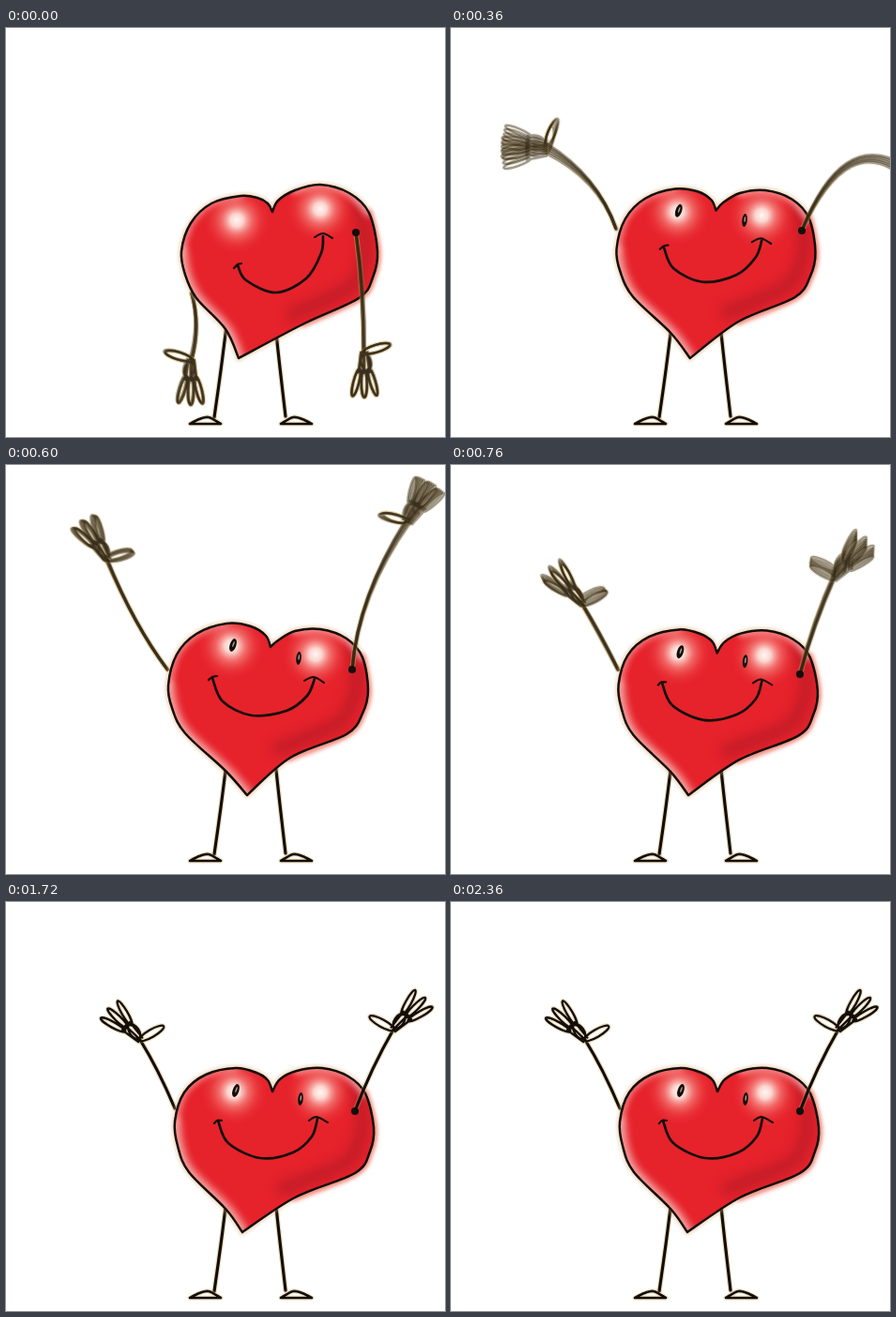
An HTML page with a canvas for the animation above (8000 ms loop, 468 px wide and 436 px high).

```html
<!DOCTYPE html>
<html lang="en">
<head>
<meta charset="utf-8">
<title>Cheering heart</title>
<style>
  html, body { margin: 0; width: 100%; height: 100%; overflow: hidden; background: #fff; }
  canvas { display: block; width: 468px; height: 436px; }
</style>
</head>
<body>
<canvas id="stage"></canvas>
<script>
const W = 468, H = 436, LOOP = 8000, STEP = 40, REST = 840;
const INK = '#130e09';
const canvas = document.getElementById('stage');
const ratio = window.devicePixelRatio || 1;
canvas.width = W * ratio;
canvas.height = H * ratio;
const ctx = canvas.getContext('2d');

// Three body poses as x,y pairs: leaning, stretched, settled.
const POSES = [
  {
    left: [284,196, 279,187, 268,181, 250,179, 219,187, 197,208, 187,238, 191,263, 203,288, 234,321, 248,352],
    right: [284,196, 290,184, 308,173, 335,167, 366,176, 387,197, 396,238, 391,266, 376,288, 318,315, 248,352],
    smile: [247,253, 256,269, 288,282, 320,267, 336,240, 338,222],
    ticks: [243,256, 247,252, 251,251, 329,223, 338,219, 348,224],
    eyes: [245,203, 316,202],
    glows: [246,205, 335,193]
  },
  {
    left: [282,194, 277,182, 261,172, 235,169, 203,180, 182,202, 173,235, 177,259, 191,286, 234,326, 257,352],
    right: [282,194, 290,187, 308,177, 335,175, 363,185, 380,205, 386,240, 380,265, 363,287, 303,312, 257,352],
    smile: [220,227, 231,252, 262,267, 299,262, 321,246, 329,228],
    ticks: [216,229, 220,226, 225,225, 318,230, 328,226, 339,232],
    eyes: [242,192, 312,206],
    glows: [240,193, 330,202]
  },
  {
    left: [284,202, 279,190, 267,182, 245,177, 213,184, 190,203, 180,234, 183,260, 195,288, 234,327, 252,352],
    right: [284,202, 292,189, 310,180, 337,177, 365,186, 383,204, 392,240, 388,266, 372,289, 308,315, 252,352],
    smile: [226,233, 237,257, 271,273, 306,267, 326,250, 332,231],
    ticks: [222,236, 225,233, 230,233, 323,233, 331,229, 343,235],
    eyes: [245,201, 314,210],
    glows: [243,202, 335,203]
  }
];

// time, weight of stretched pose, weight of settled pose
const BODY = [[0, 0, 0], [160, 0, 0], [360, .75, 0], [600, 1, 0], [760, .2, .8], [840, 0, 1]];

// time, shoulder, elbow, wrist, hand angle in degrees
const LEFT_ARM = [
  [0,   198,283, 203,318, 198,354, 90],
  [160, 186,237, 140,233, 103,256, 68],
  [360, 176,214, 148,165, 102,128, 181],
  [600, 172,218, 138,165, 107,100, 237],
  [760, 178,218, 158,180, 139,147, 226],
  [840, 180,220, 162,181, 143,147, 223]
];
const RIGHT_ARM = [
  [0,   373,218, 379,281, 381,346, 90],
  [160, 374,218, 452,195, 462,280, 130],
  [360, 374,216, 424,146, 482,152, 30],
  [600, 369,218, 387,139, 428,60, -58],
  [760, 372,223, 388,170, 409,117, -45],
  [840, 372,223, 391,178, 413,136, -44]
];
const EYES = [[0, 0], [120, 0], [160, .14], [320, 1], [840, 1]];

// Smooth value of a keyed row at time t
function keyed(rows, t) {
  const last = rows.length - 1;
  if (t <= rows[0][0]) return rows[0].slice(1);
  if (t >= rows[last][0]) return rows[last].slice(1);
  const i = rows.findIndex(row => row[0] > t) - 1;
  const a = rows[i], b = rows[i + 1], span = b[0] - a[0], u = (t - a[0]) / span;
  const slope = (k, c) => k === 0 || k === last ? 0
    : (rows[k + 1][c] - rows[k - 1][c]) / (rows[k + 1][0] - rows[k - 1][0]);
  return a.slice(1).map((v, n) => {
    const c = n + 1, u2 = u * u, u3 = u2 * u;
    return (2 * u3 - 3 * u2 + 1) * v + (3 * u2 - 2 * u3) * b[c]
      + span * ((u3 - 2 * u2 + u) * slope(i, c) + (u3 - u2) * slope(i + 1, c));
  });
}

function poseAt(t) {
  const [stretch, settle] = keyed(BODY, t), pose = {};
  for (const part in POSES[0]) {
    const flat = POSES[0][part].map((v, i) => v
      + stretch * (POSES[1][part][i] - v) + settle * (POSES[2][part][i] - v));
    pose[part] = [];
    for (let i = 0; i < flat.length; i += 2) pose[part].push([flat[i], flat[i + 1]]);
  }
  return pose;
}

function addCurve(path, pts, join) {
  path[join ? 'lineTo' : 'moveTo'](...pts[0]);
  for (let i = 0; i < pts.length - 1; i++) {
    const p = pts[i], q = pts[i + 1], before = pts[i - 1] || p, after = pts[i + 2] || q;
    path.bezierCurveTo(
      p[0] + (q[0] - before[0]) / 6, p[1] + (q[1] - before[1]) / 6,
      q[0] - (after[0] - p[0]) / 6, q[1] - (after[1] - p[1]) / 6, q[0], q[1]);
  }
  return path;
}
const curve = (...pts) => addCurve(new Path2D(), pts);

function stroke(path, color, width, blur = 0) {
  ctx.filter = blur ? `blur(${blur * ratio}px)` : 'none';
  ctx.strokeStyle = color;
  ctx.lineWidth = width;
  ctx.stroke(path);
  ctx.filter = 'none';
}

function inkLine(path, width = 3) {
  stroke(path, 'rgba(200,160,85,.35)', width + 2.4);
  stroke(path, INK, width);
}

function drawLegs() {
  inkLine(curve([235, 318], [229, 365], [222, 415]), 3.2);
  inkLine(curve([287, 316], [292, 362], [298, 414]), 3.2);
  for (const [x, side] of [[196, 1], [326, -1]]) {
    const foot = curve([x, 422], [x + 10 * side, 417], [x + 20 * side, 415], [x + 33 * side, 422]);
    foot.closePath();
    inkLine(foot, 2.6);
  }
}

function drawHand(x, y, angle, flip) {
  ctx.save();
  ctx.translate(x, y);
  ctx.rotate(angle * Math.PI / 180);
  ctx.scale(1, flip);
  const loops = new Path2D();
  const loop = (turn, middle, rx, ry) => {
    const a = turn * Math.PI / 180, cx = middle * Math.cos(a), cy = middle * Math.sin(a);
    loops.moveTo(cx + rx * Math.cos(a), cy + rx * Math.sin(a));
    loops.ellipse(cx, cy, rx, ry, a, 0, 7);
  };
  for (const turn of [-14, 1, 17]) {
    loop(turn, 33, 15, 3);
    loops.moveTo(0, turn / 5);
    loops.lineTo(22 * Math.cos(turn / 57), 22 * Math.sin(turn / 57));
  }
  loop(107, 14, 15, 4);
  loop(12, 11, 9, 5);
  inkLine(loops, 2.3);
  ctx.restore();
}

function drawArm(rows, t, flip) {
  const [sx, sy, mx, my, wx, wy, angle] = keyed(rows, t);
  const arm = new Path2D();
  arm.moveTo(sx, sy);
  arm.quadraticCurveTo(2 * mx - (sx + wx) / 2, 2 * my - (sy + wy) / 2, wx, wy);
  inkLine(arm, 3.2);
  drawHand(wx, wy, angle, flip);
}

// Fast limbs smear: several faint exposures around the moment
function drawMovingArm(rows, t, flip) {
  if (t >= REST) return drawArm(rows, t, flip);
  ctx.globalAlpha = .4;
  for (let k = -2; k <= 2; k++) drawArm(rows, t + k * 7, flip);
  ctx.globalAlpha = 1;
}

function fillGlow([x, y], radius, stops) {
  const shade = ctx.createRadialGradient(x, y, 0, x, y, radius);
  stops.forEach(([at, color]) => shade.addColorStop(at, color));
  ctx.fillStyle = shade;
  ctx.fillRect(x - radius, y - radius, 2 * radius, 2 * radius);
}

function drawBody(pose) {
  const { left, right } = pose;
  const shape = addCurve(curve(...left), [...right].reverse(), true);
  const outline = addCurve(curve(...left), right);
  const inward = right.slice(5, 10).map(([x, y]) => [x - 12, y - 10]);

  stroke(outline, 'rgba(228,175,115,.4)', 7, 1.5);
  stroke(curve(...right.slice(5, 10)), 'rgba(238,85,75,.55)', 8, 2);
  ctx.fillStyle = '#e6222b';
  ctx.fill(shape);

  ctx.save();
  ctx.clip(shape);
  stroke(curve(...inward), 'rgba(165,24,38,.5)', 15, 6);
  stroke(curve(...left.slice(6)), 'rgba(255,225,215,.75)', 11, 4);
  stroke(curve(...left.slice(3, 7)), 'rgba(255,200,195,.6)', 7, 3);
  stroke(curve(...right.slice(2, 6)), 'rgba(255,225,220,.65)', 8, 3);
  for (const spot of pose.glows) {
    fillGlow(spot, 38, [
      [0, 'rgba(255,252,248,.98)'], [.18, 'rgba(255,238,230,.88)'],
      [.42, 'rgba(250,165,155,.55)'], [.72, 'rgba(242,95,90,.22)'], [1, 'rgba(230,34,43,0)']]);
  }
  ctx.restore();
  stroke(outline, INK, 2.5);
}

function drawEye([x, y], open, rx, ry, tilt) {
  if (open < .04) return;
  ctx.save();
  ctx.translate(x, y);
  ctx.scale(1, open);
  ctx.rotate(tilt);
  const oval = (dx, dy, a, b, color) => {
    ctx.fillStyle = color;
    ctx.beginPath();
    ctx.ellipse(dx, dy, a, b, 0, 0, 7);
    ctx.fill();
  };
  oval(0, 0, rx, ry, INK);
  oval(.2, -1, .8, ry * .45, 'rgba(220,190,185,.8)');
  ctx.restore();
}

function drawFace(pose, open) {
  drawEye(pose.eyes[0], open, 3.4, 7.2, .32);
  drawEye(pose.eyes[1], open, 2.7, 7, .1);
  stroke(curve(...pose.smile), INK, 2.7);
  stroke(curve(...pose.ticks.slice(0, 3)), INK, 2.2);
  stroke(curve(...pose.ticks.slice(3)), INK, 2);
}

function eyeOpening(t) {
  if (t > 1040 && t < 1720) return 1 - Math.sin(Math.PI * (t - 1040) / 680) ** 2;
  return Math.min(1, Math.max(0, keyed(EYES, t)[0]));
}

function draw(t) {
  ctx.setTransform(ratio, 0, 0, ratio, 0, 0);
  ctx.fillStyle = '#fff';
  ctx.fillRect(0, 0, W, H);
  ctx.lineCap = ctx.lineJoin = 'round';
  const pose = poseAt(t);
  drawLegs();
  drawMovingArm(LEFT_ARM, t, 1);
  drawBody(pose);
  drawFace(pose, eyeOpening(t));
  drawMovingArm(RIGHT_ARM, t, -1);
  const [x, y] = keyed(RIGHT_ARM, t);
  ctx.fillStyle = INK;
  ctx.beginPath();
  ctx.arc(x, y, 4, 0, 7);
  ctx.fill();
}

const start = performance.now();
let shown = -1;
function tick() {
  const t = Math.floor((performance.now() - start) % LOOP / STEP) * STEP;
  if (t !== shown) draw(shown = t);
  requestAnimationFrame(tick);
}
tick();
</script>
</body>
</html>
```
